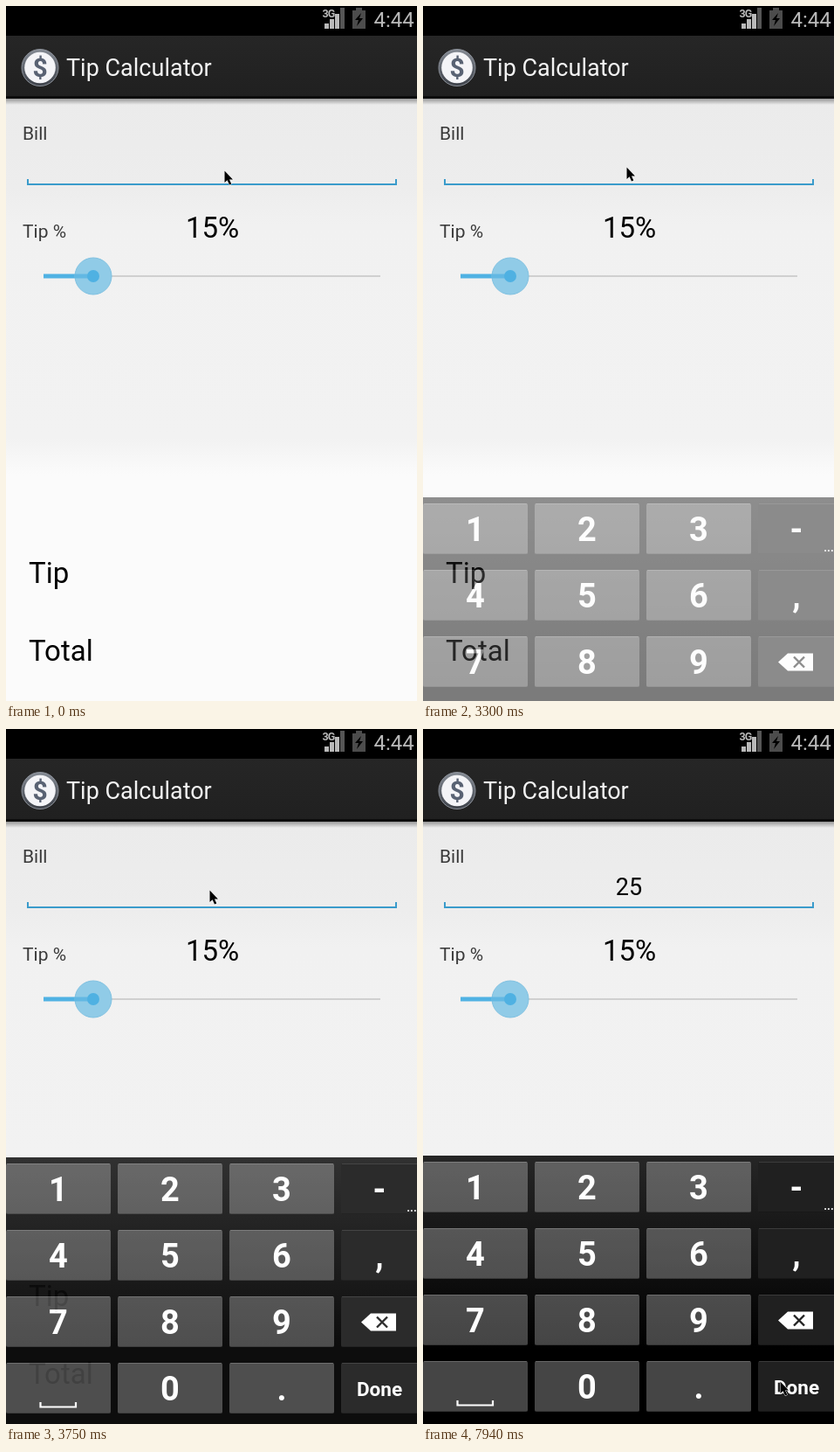
An HTML page for the animation above (8 s loop, 471x795 px).

```html
<!DOCTYPE html>
<html lang="en">
<head>
<meta charset="utf-8">
<title>Tip Calculator</title>
<style>
html, body { margin: 0; width: 100%; height: 100%; overflow: hidden; background: #fbfbfb; }
svg { display: block; width: 100%; height: 100%; font-family: Roboto, "Open Sans", sans-serif; }
.label { font-size: 21px; fill: #3a3a3a; }
.big { font-size: 33px; }
.bill { font-size: 27px; text-anchor: middle; }
.status { fill: #b9b9b9; }
.keys text { font-weight: 700; font-size: 38px; fill: #fff; text-anchor: middle; }
.keys .done { font-size: 22.5px; }
.keys .more { font-size: 13px; }

/* one loop is 8 s, so 1% is 80 ms */
.caret, .one, .two, .pressed, .board, .pointer { animation: 8s step-end infinite; }
.caret { animation-name: caret; }
.one { animation-name: one; }
.two { animation-name: two; }
.pressed { animation-name: press; }
.board { animation-name: rise; }
.pointer { animation-name: move; }

@keyframes caret {
  0% { opacity: 0; transform: translateX(0); }
  1.875% { opacity: 1; }
  9.375% { opacity: 0; }
  15% { opacity: 1; }
  22.5% { opacity: 0; }
  28.125% { opacity: 1; }
  35.625% { opacity: 0; }
  59.875% { opacity: 1; }
  65.5% { opacity: 0; }
  73% { opacity: 1; }
  78.625% { opacity: 1; transform: translateX(8px); }
  84.25% { opacity: 0; }
  89.875% { opacity: 1; transform: translateX(15px); }
  97.375%, 100% { opacity: 0; transform: translateX(15px); }
}
@keyframes one {
  0% { opacity: 0; }
  78.625% { opacity: 1; }
  89.875%, 100% { opacity: 0; }
}
@keyframes two {
  0% { opacity: 0; }
  89.875%, 100% { opacity: 1; }
}
@keyframes press {
  0% { opacity: 0; }
  88% { opacity: 1; }
  89.875%, 100% { opacity: 0; }
}
@keyframes rise {
  0% { opacity: 0; transform: translateY(74px); }
  41.25% { opacity: .51; transform: translateY(74px); }
  43.125% { opacity: .67; transform: translateY(37px); }
  45% { opacity: .82; transform: translateY(12px); }
  46.875% { opacity: .95; transform: translateY(2px); }
  48.75%, 100% { opacity: 1; transform: none; }
}
@keyframes move {
  0% { transform: translate(250px, 188px); }
  1.875% { transform: translate(247px, 187px); }
  3.75% { transform: translate(245px, 186px); }
  28.125% { transform: translate(238px, 185px); }
  30% { transform: translate(233px, 184px); }
  50.5% { transform: translate(228px, 215px); }
  52.375% { transform: translate(212px, 310px); }
  54.25% { transform: translate(187px, 444px); }
  56.125% { transform: translate(170px, 588px); }
  59.875% { transform: translate(148px, 560px); }
  61.75% { transform: translate(156px, 533px); }
  63.625% { transform: translate(169px, 519px); }
  80.5% { transform: translate(169px, 540px); }
  82.375% { transform: translate(170px, 585px); }
  84.25% { transform: translate(170px, 601px); }
  91.75% { transform: translate(250px, 650px); }
  93.625% { transform: translate(377px, 726px); }
  97.375% { transform: translate(402px, 743px); }
  99.25%, 100% { transform: translate(409px, 746px); }
}
</style>
</head>
<body>
<svg viewBox="0 0 471 795" preserveAspectRatio="none">
  <defs>
    <linearGradient id="page" gradientUnits="userSpaceOnUse" x1="0" y1="106" x2="0" y2="795">
      <stop offset="0" stop-color="#ebebeb"/>
      <stop offset=".15" stop-color="#ededed"/>
      <stop offset=".21" stop-color="#f1f1f1"/>
      <stop offset=".565" stop-color="#f2f2f2"/>
      <stop offset=".625" stop-color="#fbfbfb"/>
      <stop offset="1" stop-color="#fbfbfb"/>
    </linearGradient>
    <linearGradient id="bar" x2="0" y2="1">
      <stop offset="0" stop-color="#262626"/>
      <stop offset="1" stop-color="#202020"/>
    </linearGradient>
    <linearGradient id="shade" x2="0" y2="1">
      <stop offset="0" stop-opacity=".36"/>
      <stop offset="1" stop-opacity="0"/>
    </linearGradient>
    <linearGradient id="rim" x2="0" y2="1">
      <stop offset="0" stop-color="#858b94"/>
      <stop offset="1" stop-color="#3c4048"/>
    </linearGradient>
    <linearGradient id="board" x2="0" y2="1">
      <stop offset="0" stop-color="#262626"/>
      <stop offset=".72" stop-color="#000"/>
      <stop offset="1" stop-color="#000"/>
    </linearGradient>
    <linearGradient id="lit" x2="0" y2="1">
      <stop offset="0" stop-color="#929292"/>
      <stop offset="1" stop-color="#7f7f7f"/>
    </linearGradient>
  </defs>

  <rect width="471" height="795" fill="url(#page)"/>
  <rect y="106" width="471" height="7" fill="url(#shade)"/>
  <rect width="471" height="34" fill="#000"/>
  <rect y="34" width="471" height="70" fill="url(#bar)"/>
  <rect y="103" width="471" height="3" fill="#0c0c0c"/>

  <g class="status">
    <path d="M365 26v-6h5v6zM371 26v-11h5v11zM377 26v-17h5v17z"/>
    <path d="M383 26V2h5v24z" fill="#555"/>
    <text x="362.5" y="12.5" font-size="12.5" font-weight="700" letter-spacing="-1">3G</text>
    <path d="M401 2h7v3h4v21h-15V5h4z" fill="#4c4c4c"/>
    <path d="M407 8l-7 8h4l-2 7 7-9h-4z" fill="#000"/>
    <text x="421.5" y="24" font-size="24">4:44</text>
  </g>

  <circle cx="39" cy="70.5" r="21" fill="url(#rim)" stroke="#8d929b"/>
  <circle cx="39" cy="70.5" r="17.8" fill="#f4f4f7"/>
  <text x="39" y="81" font-size="30" font-weight="700" fill="#596273" text-anchor="middle">$</text>
  <text x="69" y="80" font-size="27" fill="#f2f2f2">Tip Calculator</text>

  <text class="label" x="19" y="153">Bill</text>
  <path d="M25 198v6h422v-6" fill="none" stroke="#3a9bcb" stroke-width="2"/>
  <text class="bill one" x="236" y="190">2</text>
  <text class="bill two" x="236" y="190">25</text>
  <rect class="caret" x="235" y="161" width="1.5" height="37" fill="#3a9bcb"/>

  <text class="label" x="19" y="265">Tip %</text>
  <text class="big" x="206" y="265">15%</text>
  <path d="M43 309H429" stroke="#d0d0d0" stroke-width="2"/>
  <path d="M43 309H100" stroke="#50b2e3" stroke-width="5"/>
  <circle cx="100" cy="309" r="21" fill="#90cbe7" stroke="#7fc0e0"/>
  <path d="M79 309H100" stroke="#62b8e3" stroke-width="5"/>
  <circle cx="100" cy="309" r="7" fill="#4fb1e2"/>

  <text class="big" x="26" y="660">Tip</text>
  <text class="big" x="26" y="749">Total</text>

  <g class="board">
    <rect y="488" width="471" height="307" fill="url(#board)"/>
    <g class="keys" id="keys"></g>
    <path d="M39.5 768v5.5h40.5v-5.5" fill="none" stroke="#fff" stroke-width="2.2"/>
    <path d="M407 676.5l11-10h29v20h-29z" fill="#fff"/>
    <path d="M425 670.5l12 12m0-12l-12 12" stroke="#222" stroke-width="2.4"/>
  </g>

  <path class="pointer" d="M.5 .5V14L3.6 11.2 6 16.5 8.3 15.5 6 10.4H10z"
        fill="#000" stroke="#fff" stroke-width="1" paint-order="stroke"/>
</svg>
<script>
const keys = document.getElementById('keys');
const rows = [['1', '2', '3', '-'], ['4', '5', '6', ','], ['7', '8', '9', ''], ['', '0', '.', 'Done']];

function add(tag, attrs, text = '') {
  const node = document.createElementNS('http://www.w3.org/2000/svg', tag);
  for (const name in attrs) node.setAttribute(name, attrs[name]);
  node.textContent = text;
  keys.append(node);
}

rows.forEach((row, r) => row.forEach((label, c) => {
  const side = c === 3;
  const x = c * 128, y = 495 + r * 76;
  const width = side ? 92 : 120;
  const box = { x, y, width, height: 58, rx: 2 };
  add('rect', { ...box, fill: side ? '#202020' : '#fff', 'fill-opacity': side ? 1 : .27 });
  add('rect', { x: x + 1, y, width: width - 2, height: 1, fill: '#fff', 'fill-opacity': side ? .12 : .18 });
  add('rect', { x: x + 1, y: y + 57, width: width - 2, height: 1, fill: '#000', 'fill-opacity': .25 });
  if (label === '5') add('rect', { ...box, fill: 'url(#lit)', class: 'pressed' });
  const done = label === 'Done';
  add('text', { x: side ? 428 : x + 60, y: y + (done ? 38 : 43), class: done ? 'done' : '' }, label);
}));
add('text', { x: 465, y: 550, class: 'more' }, '...');
</script>
</body>
</html>
```
